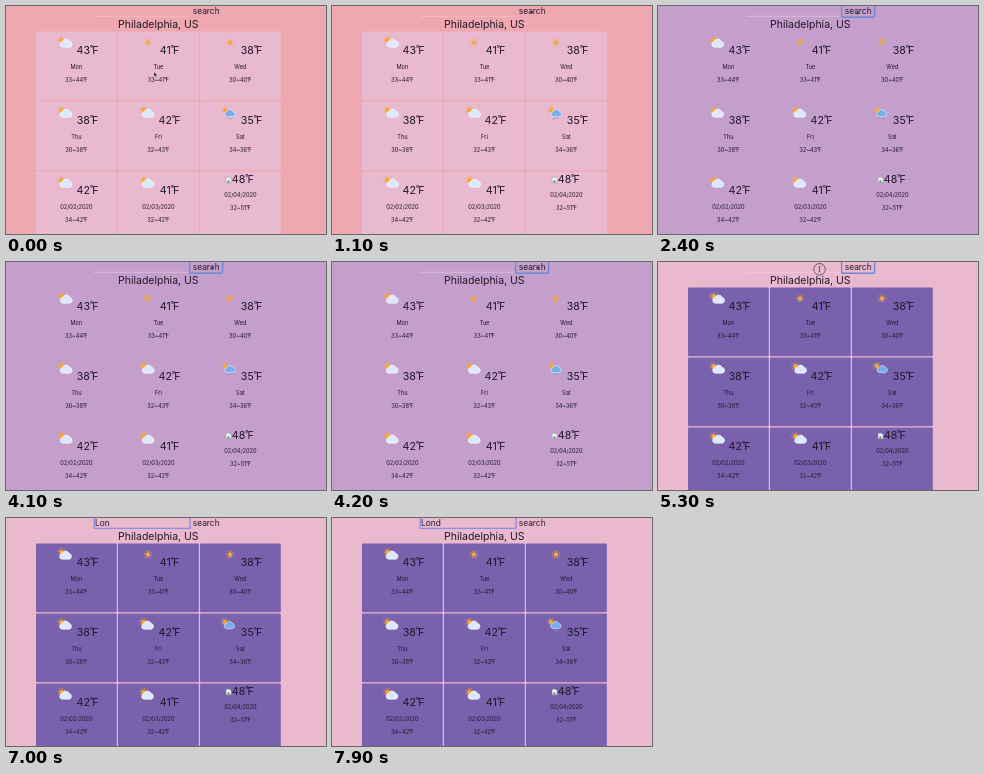
Animation, 320 px wide and 228 px high, one loop 8000 ms. Source, as an HTML page:

```html
<!DOCTYPE html>
<html lang="en">
<head>
<meta charset="utf-8">
<title>Weather</title>
<style>
html, body { margin: 0; width: 100%; height: 100%; overflow: hidden; }
svg { display: block; width: 320px; height: 228px; font-family: Inter, "Noto Sans", sans-serif; }
text { fill: #21182a; text-anchor: middle; }
.temp { font-size: 10.7px; }
.small { font-size: 5.7px; }
.head { font-size: 10.5px; }
.ui { font-size: 8.4px; }
.start { text-anchor: start; }
.ring { letter-spacing: -.1em; }
.ray { stroke: #f2a844; stroke-width: .7; stroke-linecap: round; }
.drop { stroke: #559be6; stroke-width: .8; stroke-linecap: round; }
</style>
</head>
<body>
<svg id="stage" viewBox="0 0 320 228"></svg>
<script>
const LOOP = 8000;
const stage = document.getElementById('stage');

function add(parent, tag, attrs = {}, label) {
  const el = document.createElementNS('http://www.w3.org/2000/svg', tag);
  for (const key in attrs) el.setAttribute(key, attrs[key]);
  if (label) el.textContent = label;
  parent.append(el);
  return el;
}
const write = (x, y, cls, label) => add(stage, 'text', { x, y, class: cls }, label);
function degrees(x, y, cls, value) {
  const el = write(x, y, cls, value);
  add(el, 'tspan', { class: 'ring' }, '˚');
  add(el, 'tspan', {}, 'F');
}
const show = (el, on) => el.setAttribute('visibility', on ? 'visible' : 'hidden');
const place = (el, x, y) => el.setAttribute('transform', `translate(${x} ${y})`);

const themes = [
  { at: 0, page: '#efa8b0', card: '#e9b9cf', line: '#f3c3cc' },
  { at: 2400, page: '#c49fcc', card: '#c49fcc', line: '#dcc3e2' },
  { at: 4300, page: '#ebb9ce', card: '#7961ad', line: '#f2d0de' }
];
const days = [
  ['43', 'Mon', '33~44', 'cloud'], ['41', 'Tue', '33~41', 'sun'], ['38', 'Wed', '30~40', 'sun'],
  ['38', 'Thu', '30~38', 'cloud'], ['42', 'Fri', '32~43', 'cloud'], ['35', 'Sat', '34~36', 'rain'],
  ['42', '02/02/2020', '34~42', 'cloud'], ['41', '02/03/2020', '32~42', 'cloud'],
  ['48', '02/04/2020', '32~51', 'missing']
];
const spins = [], clouds = [], drops = [], cards = [];

function drawSun(parent, x, y, r) {
  const g = add(add(parent, 'g', { transform: `translate(${x} ${y})` }), 'g');
  add(g, 'circle', { r, fill: '#f4a73c' });
  for (let a = 0; a < 360; a += 45)
    add(g, 'line', { class: 'ray', y1: r + .9, y2: r + 1.7, transform: `rotate(${a})` });
  spins.push(g);
}
function drawCloud(parent, fill, x, y, scale) {
  const holder = add(parent, 'g', { transform: `translate(${x} ${y}) scale(${scale})` });
  const g = add(holder, 'g');
  add(g, 'path', { fill, stroke: '#fff', 'stroke-width': .5,
    d: 'M-2.5 4.5a2.7 2.7 0 0 1-.2-5.3a3.6 3.6 0 0 1 6.6-.1a2.8 2.8 0 0 1 .2 5.4z' });
  clouds.push(g);
}
function drawIcon(kind, x, y) {
  const g = add(stage, 'g', { transform: `translate(${x} ${y})` });
  if (kind === 'sun') drawSun(g, 1.5, 0, 2.2);
  if (kind === 'cloud') {
    drawSun(g, -3, -2.4, 2.3);
    drawCloud(g, '#dce9fb', .9, -.2, 1.1);
  }
  if (kind === 'rain') {
    drawSun(g, -3.6, -2.6, 2.2);
    for (const dx of [-1, 1.2, 3.4])
      drops.push(add(g, 'line', { class: 'drop', x1: dx + .3, x2: dx - .3, y1: 0, y2: 1.6 }));
    drawCloud(g, '#79aeee', .8, -.2, .95);
  }
  if (kind === 'missing') {
    add(g, 'path', { d: 'M-2.4-2.8h3.4l1.6 1.6v4h-5z', fill: '#f4f4f8', stroke: '#88869a', 'stroke-width': .4 });
    add(g, 'path', { d: 'M-2 2.4l1.8-2.6 2.2 2.6z', fill: '#63a869' });
  }
}

const page = add(stage, 'rect', { width: 320, height: 228 });
days.forEach(([temp, day, range, kind], i) => {
  const x = i % 3 * 82, y = Math.floor(i / 3) * 70, odd = kind === 'missing';
  cards.push(add(stage, 'rect', { x: 30 + x, y: 25.5 + y, width: 80.8, height: 68.8, rx: 1 }));
  drawIcon(kind, odd ? 222.5 : 58.5 + x, odd ? 174 : 36.5 + y);
  const lift = odd ? 12 : 0;
  degrees(odd ? 236.8 : 81.5 + x, odd ? 177 : 48 + y, 'temp', temp);
  write(70.4 + x, 63 + y - lift, 'small', day);
  degrees(70.4 + x, 75.8 + y - lift, 'small', range);
});

write(152.3, 21.9, 'head', 'Philadelphia, US');
write(200.2, 7.8, 'ui', 'search');
const underline = add(stage, 'rect', { x: 88, y: 9.8, width: 94, height: .8 });
const button = add(stage, 'rect', { x: 183.6, y: -1, width: 33, height: 12.2, rx: 1,
  fill: 'none', stroke: '#6d88d4', 'stroke-width': 1.4 });
const field = add(stage, 'rect', { x: 88.2, y: -1, width: 95.8, height: 11.4, rx: .5,
  fill: 'none', stroke: '#8d8fe0', 'stroke-width': 1.4 });
const typed = write(89, 7.8, 'ui start', '');

const arrow = add(stage, 'path', { d: 'M0 0v4.6l1.1-1 .8 1.8.8-.4-.8-1.7h1.5z',
  fill: '#151515', stroke: '#fff', 'stroke-width': .3 });
const hand = add(stage, 'path', { d: 'M-.5-1.6q.5-.7.9 0v1.2l1.6.5v1.5l-.6 1h-1.8l-1.3-1.8.5-.4.7.5z',
  fill: '#30263a', stroke: '#e9dcec', 'stroke-width': .3 });
const beam = add(stage, 'g');
add(beam, 'circle', { r: 5.8, fill: 'none', stroke: '#3b2c3e', 'stroke-width': .7 });
add(beam, 'path', { d: 'M-1.1-2.8q1.1 0 1.1.8q0-.8 1.1-.8M0-2v4M-1.1 2.8q1.1 0 1.1-.8q0 .8 1.1.8',
  fill: 'none', stroke: '#2c202e', 'stroke-width': .6 });

// Pointer path: time, x, y
const path = [[0, 148, 66], [200, 148, 66], [900, 199, 5], [2300, 199, 6], [3000, 203, 5],
  [4100, 206, 4.5], [4700, 204, 5], [5200, 161.5, 7.3], [8000, 161.5, 7.3]];
function pointer(t) {
  const i = path.findIndex(p => p[0] > t);
  const [t0, x0, y0] = path[i - 1], [t1, x1, y1] = path[i];
  const u = (t - t0) / (t1 - t0), k = u * u * (3 - 2 * u);
  return [x0 + (x1 - x0) * k, y0 + (y1 - y0) * k];
}
const keys = [[6100, 'L'], [6500, 'Lo'], [6900, 'Lon'], [7500, 'Lond']];
const last = (list, test) => list.filter(test).pop();

function render(t) {
  const theme = last(themes, s => s.at <= t);
  page.setAttribute('fill', theme.page);
  underline.setAttribute('fill', theme.line);
  for (const c of cards) c.setAttribute('fill', theme.card);

  for (const s of spins) s.setAttribute('transform', `rotate(${t * .06})`);
  const sway = .5 * Math.sin(t / LOOP * Math.PI * 4);
  for (const c of clouds) place(c, sway, 0);
  drops.forEach((d, i) => place(d, 0, 3.4 + (t / 600 + i / 3) % 1 * 2.6));

  const focus = t >= 5500;
  show(field, focus);
  show(underline, !focus);
  show(button, t >= 1500 && !focus);
  const key = last(keys, k => k[0] <= t);
  typed.textContent = key ? key[1] : '';

  const [x, y] = pointer(t);
  const over = x > 184 && y < 11, inField = t > 4700 && x < 183;
  [arrow, hand, beam].forEach(p => place(p, x, y));
  show(arrow, !over && !inField);
  show(hand, over);
  show(beam, inField && !focus);
}
function tick() {
  render(performance.now() % LOOP);
  requestAnimationFrame(tick);
}
tick();
</script>
</body>
</html>
```
